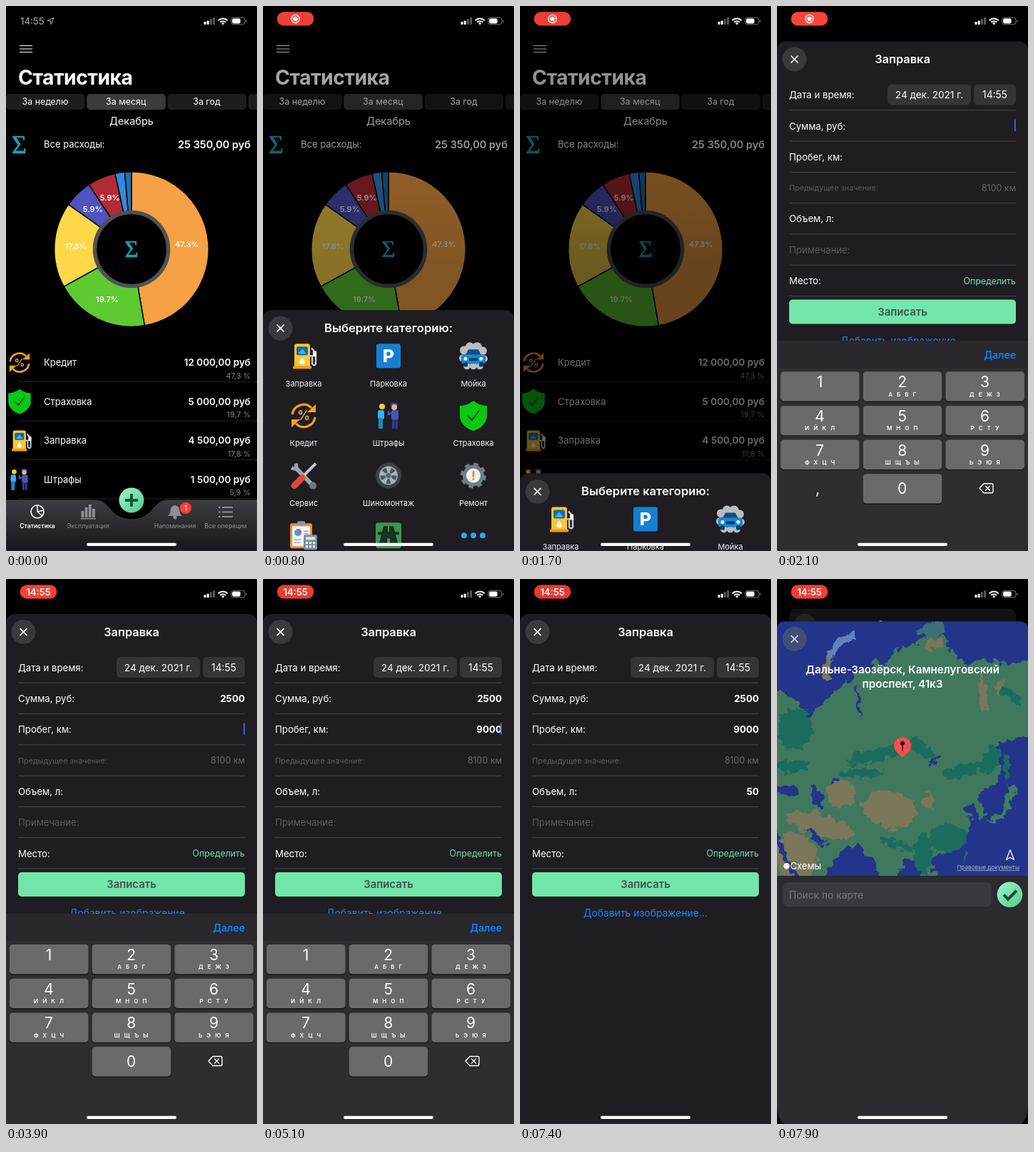
Write an HTML page that moves like this. It is 352 px wide and 762 px high and loops after 8000 ms.

```html
<!DOCTYPE html>
<html lang="ru">
<head>
<meta charset="utf-8">
<title>Расходы</title>
<style>
html, body { margin: 0; width: 100%; height: 100%; overflow: hidden; background: #000; }
svg { display: block; width: 100%; height: 100%; font-family: Inter, Roboto, sans-serif; }
</style>
</head>
<body>
<svg id="stage" viewBox="0 0 352 762"></svg>
<script>
const T = (x, y, size, str, fill = '#fff', anchor = 'start', weight = 400, extra = '') =>
  `<text x="${x}" y="${y + size * .36}" font-size="${size}" fill="${fill}" text-anchor="${anchor}" font-weight="${weight}" ${extra}>${str}</text>`;
const R = (x, y, w, h, fill, r = 0, extra = '') =>
  `<rect x="${x}" y="${y}" width="${w}" height="${h}" rx="${r}" fill="${fill}" ${extra}/>`;
const C = (x, y, r, fill, extra = '') => `<circle cx="${x}" cy="${y}" r="${r}" fill="${fill}" ${extra}/>`;
const F = (d, fill, extra = '') => `<path d="${d}" fill="${fill}" ${extra}/>`;
const L = (d, stroke, w = 1, extra = '') =>
  `<path d="${d}" fill="none" stroke="${stroke}" stroke-width="${w}" ${extra}/>`;
const G = (id, body, extra = '') => `<g id="${id}" ${extra}>${body}</g>`;
const at = (x, y, s, body) => `<g transform="translate(${x} ${y}) scale(${s})">${body}</g>`;
const round = 'stroke-linecap="round" stroke-linejoin="round"';
const SHEET = '#1f1d22', GRAY = '#8e8e93';

const icons = {
  fuel: R(-13, -17, 22, 34, '#ffc72c', 3) + R(-10, -13, 16, 12, '#1768b0', 2) + F('M-8 -3L-2 -10 4 -3Z', '#37b6f2') +
    R(-15, 14, 26, 4, '#e8a020', 1) + F('M-2 2C4 9 2 12 -2 12S-8 9 -2 2Z', '#f4f4f4') +
    L('M9 0H12V11Q15 15 17 11V-4L11 -11', '#c9ced3', 2.4) + R(13, -7, 5, 8, '#f2f2f2', 1),
  parking: R(-17, -17, 34, 34, '#1580d2', 3) + T(0, 0, 25, 'P', '#fff', 'middle', 800),
  wash: [[-13, -8, 6], [-5, -13, 6], [5, -12, 7], [13, -7, 6], [-15, 3, 5], [15, 4, 5], [-9, 14, 5], [9, 14, 5], [0, 14, 5], [0, -7, 7]]
    .map(c => C(...c, '#b9bcc0')).join('') + F('M-11 -1L-7 -9H7L11 -1Z', '#114f80') +
    R(-17, -2, 34, 13, '#1688d4', 4) + R(-14, 9, 6, 6, '#0d3c60', 1) + R(8, 9, 6, 6, '#0d3c60', 1) +
    C(-11, 4, 2.5, '#fff') + C(11, 4, 2.5, '#fff') + R(-6, 3, 12, 4, '#0d3c60', 1),
  credit: L('M-16 -2A16 16 0 0 1 11 -11M16 2A16 16 0 0 1 -11 11', '#ffa01c', 3.2) +
    F('M17 -16V-5H5ZM-17 16V5H-5Z', '#ffa01c') + T(0, 0, 18, '%', '#ffa01c', 'middle', 600),
  fines: C(-9, -13, 4, '#ffca3a') + R(-15, -8, 9, 13, '#35b2ee', 3) + R(-14, 3, 6, 15, '#1f86c8', 1) +
    R(3, -18, 10, 4, '#3646a8', 2) + C(8, -12, 4, '#e3b088') + R(4, -8, 10, 14, '#4656bb', 3) +
    L('M5 -4L0 -2V-7', '#4656bb', 2.5) + R(5, 5, 3.5, 13, '#2f3c92') + R(9.5, 5, 3.5, 13, '#2f3c92'),
  shield: F('M0 -21Q9 -14 19 -14V0C19 11 9 18 0 21C-9 18 -19 11 -19 0V-14Q-9 -14 0 -21Z', '#08c912') +
    L('M-8 0L-2 6 8 -7', '#0a4a12', 2),
  tools: L('M-11 -11L12 13', '#9aa4ad', 6, round) + L('M-17 -11Q-8 -6 -11 -17', '#9aa4ad', 5) +
    L('M17 -17L0 0', '#c3c9ce', 4) + L('M-2 3L-13 14', '#e0483f', 9, round) + C(13, 14, 5, '#6d767e'),
  tire: C(0, 0, 18, '#3d4248') + C(0, 0, 13, '#a8b2ba') + C(0, 0, 8, 'none', 'stroke="#4d555d" stroke-width="7" stroke-dasharray="5 5.05"') +
    C(0, 0, 3.5, '#5b646c'),
  repair: C(0, 0, 15, '#727c87', 'stroke="#727c87" stroke-width="6" stroke-dasharray="6 5.78"') + C(0, 0, 10, '#f3f3f3') +
    T(0, 0, 17, '!', '#ff8a10', 'middle', 800),
  tax: R(-19, -17, 31, 35, '#ef8f33', 3) + R(-16, -13, 25, 28, '#f5f5f5') + R(-9, -20, 11, 6, '#8d9aa5', 2) +
    C(-8, -4, 5, '#3aa5e8') + F('M-8 -4V-9A5 5 0 0 1 -3 -4Z', '#e8503f') + L('M0 -6H7M0 -2H7M-14 6H-4M-14 10H-4', '#9fb2bf', 1.4) +
    R(0, -1, 19, 21, '#78919f', 2) + R(3, 2, 13, 4, '#d8f0e0') +
    [0, 1, 2, 3, 4, 5].map(i => R(3 + i % 3 * 5, 9 + (i > 2) * 5, 3, 3, '#fff')).join(''),
  road: R(-18, -18, 36, 36, '#419351', 4) + F('M-7 -13H-1V-5H1V-13H7L9 -5H15V-1H10L14 14H2V4H-2V14H-14L-10 -1H-15V-5H-9Z', '#16331d'),
  more: [-13, 0, 13].map(x => C(x, 0, 4, '#27a9ee')).join('')
};
const sigma = (x, base, size) =>
  `<text x="${x}" y="${base}" font-size="${size}" text-anchor="middle" fill="#17a3bd" stroke="#17a3bd" stroke-width=".7" font-family="Liberation Serif, serif">Σ</text>`;
const closeBtn = (y, fill) => C(24.5, y, 17, fill) + L(`M20 ${y - 4.5}l9 9m0 -9l-9 9`, '#fff', 1.7, round);

function donut() {
  const slices = [[47.3, '#f6a144'], [19.7, '#5eca32'], [17.8, '#fed849'], [5.9, '#4f52bf'], [5.9, '#b32b35'], [2, '#2e8cdc'], [1.4, '#2470b8']];
  const pt = (v, r) => [176 + r * Math.sin(v * Math.PI / 50), 340 - r * Math.cos(v * Math.PI / 50)];
  let sum = 0, body = '', labels = '';
  for (const [v, color] of slices) {
    body += F(`M176 340L${pt(sum, 108.3)}A108.3 108.3 0 0 1 ${pt(sum + v, 108.3)}Z`, color, 'stroke="#000" stroke-width="1.5"');
    if (v > 5) labels += T(...pt(sum + v / 2, 78), 11, v + '%', '#fff', 'middle', 600);
    sum += v;
  }
  return body + labels + C(176, 340, 51.5, '#000', 'stroke="#505157" stroke-width="5.5"') + sigma(176, 351, 33);
}

function page() {
  const rows = [['credit', 'Кредит', '12 000,00', '47,3'], ['shield', 'Страховка', '5 000,00', '19,7'],
    ['fuel', 'Заправка', '4 500,00', '17,8'], ['fines', 'Штрафы', '1 500,00', '5,9']];
  const list = rows.map(([icon, name, sum, part], i) => {
    const y = 498.5 + i * 54.5;
    return at(icon == 'fuel' ? 20.5 : 19, y, .83, icons[icon]) + T(53, y, 13, name) + T(343, y, 13.5, sum + ' руб', '#fff', 'end', 600) +
      T(343, y + 18.5, 10.7, part + ' %', '#85858a', 'end') + R(18, y + 26.5, 334, 1, '#232326');
  }).join('');
  const tabs = ['За неделю', 'За месяц', 'За год', ''].map((s, i) =>
    R(i * 113.3, 123, 110.5, 22, i == 1 ? '#3b3b3e' : '#1d1d20', 5) + T(55 + i * 113.2, 134, 12.4, s, '#fff', 'middle')).join('');
  const nav = F('M0 691H126C146 691 145 718 176 718S206 691 226 691H352V762H0Z', 'url(#bar)', 'stroke="#48474c" stroke-width=".8"') +
    C(176, 691, 17.5, 'url(#mint)') + L('M176 682V700M167 691H185', '#0b5a3b', 4) +
    C(44, 707, 9, 'none', 'stroke="#fff" stroke-width="1.6"') + L('M44 698V707L51 713M44 707L53 705', '#fff', 1.5) +
    [9, 14, 18, 12].map((h, i) => R(105.5 + i * 5.2, 715 - h, 3.8, h, GRAY)).join('') + R(105, 716, 21, 1.5, GRAY) +
    F('M227 713C231 709 230 707 231 703Q232 699 237 698Q242 699 243 703C244 707 243 709 247 713Z', GRAY) + C(237, 715, 2.5, GRAY) +
    C(252, 702, 8, '#fc4038') + T(252, 702, 10, '1', '#fff', 'middle') +
    [701, 707.5, 714].map(y => R(298, y - 1, 2.5, 2, GRAY) + R(303, y - 1, 15, 2, GRAY)).join('') +
    T(44, 727, 8.6, 'Статистика', '#fff', 'middle', 600) + T(115, 727, 8.7, 'Эксплуатация', GRAY, 'middle') +
    T(237, 727, 8.7, 'Напоминания', GRAY, 'middle') + T(308, 727, 8.7, 'Все операции', GRAY, 'middle');
  return R(0, 0, 352, 762, '#000') + L('M19 55.5H37M19 60H37M19 64.5H37', '#fff', 1.2) +
    T(17, 99.5, 28.3, 'Статистика', '#fff', 'start', 700, 'letter-spacing="-.5"') + tabs + T(176, 161, 14.5, 'Декабрь', '#fff', 'middle') +
    sigma(18.5, 206, 36) + T(53, 193.5, 13, 'Все расходы:') + T(343, 193.5, 14.5, '25 350,00 руб', '#fff', 'end', 600) +
    donut() + list + nav;
}

function picker() {
  const names = ['Заправка', 'Парковка', 'Мойка', 'Кредит', 'Штрафы', 'Страховка', 'Сервис', 'Шиномонтаж', 'Ремонт', 'Налоги', 'Проезд', 'Прочее'];
  const order = ['fuel', 'parking', 'wash', 'credit', 'fines', 'shield', 'tools', 'tire', 'repair', 'tax', 'road', 'more'];
  return R(0, 350, 352, 430, SHEET, 12) + closeBtn(375.5, '#3b393e') + T(176, 375, 16.6, 'Выберите категорию:', '#fff', 'middle', 600) +
    names.map((s, i) => {
      const x = 57 + i % 3 * 119, y = 414 + (i / 3 | 0) * 83.7;
      return at(x, y, 1, icons[order[i]]) + T(x, y + 38.5, 11, s, '#f2f2f2', 'middle');
    }).join('');
}

const fieldY = [167, 210, 297];
function form() {
  const dim = '#5b5a5f';
  const rows = ['Дата и время:', 'Сумма, руб:', 'Пробег, км:', 'Предыдущее значение:', 'Объем, л:', 'Примечание:', 'Место:'];
  return R(0, 49, 352, 740, SHEET, 12) + closeBtn(74, '#3b393e') + T(176, 74, 16.4, 'Заправка', '#fff', 'middle', 600) +
    rows.map((s, i) => T(17, 124 + i * 43.3, i == 3 ? 10.8 : 13.2, s, i == 3 || i == 5 ? dim : '#fff') +
      R(17, 144.7 + i * 43.3, 318, 1, '#47464a')).join('') +
    R(155, 109, 117, 29, '#353439', 6) + T(213.5, 124, 13.6, '24 дек. 2021 г.', '#fff', 'middle') +
    R(276, 109, 59, 29, '#353439', 6) + T(305.5, 124, 13.8, '14:55', '#fff', 'middle') +
    T(335, 254, 12.4, '8100 км', '#68676c', 'end') + T(335, 384, 12.4, 'Определить', '#6fe4a8', 'end') +
    fieldY.map((y, i) => T(335, y, 13.4, '', '#fff', 'end', 700, `id="val${i}"`)).join('') +
    R(333, 0, 1.8, 17, '#4963e6', 1, 'id="caret"') +
    R(17, 410, 318, 34, '#72e6ab', 5) + T(176, 427, 14.9, 'Записать', '#46504b', 'middle', 600) +
    T(176, 467, 13.9, 'Добавить изображение...', '#1a84fb', 'middle');
}

function keyboard() {
  const letters = ['', 'АБВГ', 'ДЕЖЗ', 'ИЙКЛ', 'МНОП', 'РСТУ', 'ФХЦЧ', 'ШЩЪЫ', 'ЬЭЮЯ'];
  const key = (n, col, row, sub) => {
    const x = 5 + col * 115.7, y = 511 + row * 47.7;
    return R(x, y + 1, 110.5, 41.7, '#161618', 4.5) + R(x, y, 110.5, 41.3, '#6a696c', 4.5, `id="key${n}"`) +
      T(x + 55, y + (n ? 14.5 : 20.5), 21, n, '#fff', 'middle') +
      (sub ? T(x + 56, y + 31.5, 8, [...sub].join(' '), '#fff', 'middle', 600, 'letter-spacing="2"') : '');
  };
  return R(0, 468, 352, 300, '#2e2d30') + R(0, 468, 352, 38, '#29282c') + T(335, 487.5, 14, 'Далее', '#0f80ff', 'end', 600) +
    letters.map((s, i) => key(i + 1, i % 3, i / 3 | 0, s)).join('') + key(0, 1, 3) +
    T(57, 674, 21, ',', '#fff', 'middle', 400, 'id="comma"') +
    L('M284 674L290 667.5H301Q303 667.5 303 669.5V678.5Q303 680.5 301 680.5H290ZM292.5 671l6 6m0 -6l-6 6', '#fff', 1.4, round);
}

function mapSheet() {
  const teal = '#1c6c5e', tan = '#7b775b', sea = '#22358b';
  const E = (x, y, rx, ry, fill, turn = 0) => `<ellipse rx="${rx}" ry="${ry}" fill="${fill}" transform="translate(${x} ${y}) rotate(${turn})"/>`;
  const land = 'M-15 152L12 160 30 174 45 190 60 178 78 160 98 148 112 128 128 130 140 112 150 125 165 102 182 96 205 84 235 78 240 98 255 112 268 122 285 112 315 120 365 112V222L335 224 308 232 298 246 316 262 308 285 288 298 284 306 292 332 284 334 274 312 262 318 274 334 266 356 252 376 230 386 214 392 218 404 228 430H205L196 392 182 392 162 430H150L134 392 118 376 100 372 88 384 60 430H-15Z';
  const blobs = E(25, 210, 24, 30, teal, 10) + E(20, 262, 24, 9, teal) + E(135, 248, 40, 9, teal, -12) + E(120, 272, 32, 6, teal) +
    E(205, 240, 24, 9, teal, 40) + E(262, 268, 30, 9, teal, -20) + E(300, 255, 12, 22, teal, 20) + E(240, 362, 26, 20, teal) +
    E(205, 385, 12, 28, teal) + E(168, 372, 26, 5, teal, 15) + E(330, 165, 18, 7, teal, 40) +
    E(90, 302, 20, 18, tan) + E(158, 322, 38, 27, tan, 10) + E(60, 345, 48, 16, tan, 15) + E(25, 388, 30, 34, tan, -25) +
    E(213, 310, 8, 12, tan) + E(288, 160, 5, 26, tan, -8) + E(312, 150, 4, 12, tan, 20) + E(220, 92, 15, 6, tan, -20);
  const water = E(14, 297, 19, 7, sea, 10) + E(56, 305, 7, 19, sea, -20) + E(82, 283, 5, 5, sea) + E(48, 186, 5, 10, sea, 30) +
    L('M212 264L229 247', sea, 4) + L('M44 350L68 374', sea, 7) + L('M-6 350L26 420', sea, 8) + L('M112 150L118 190', sea, 4);
  const isles = L('M70 141Q66 118 77 104', '#7b775b', 8) + L('M73 112Q80 92 108 79', '#6580c0', 9) +
    F('M198 78L206 62 230 60 236 74 216 84Z', '#426f75') + F('M318 246L326 252 324 284 318 276Z', teal) +
    F('M326 288L340 296 330 304 328 324 308 340 296 342 312 328 320 308Z', '#437c60') + F('M262 378L268 384 262 398Z', teal);
  return F('M0 72Q0 60 12 60H340Q352 60 352 72V738Q352 768 322 768H30Q0 768 0 738Z', '#2c2a2f') +
    `<g clip-path="url(#mapClip)">${R(0, 60, 352, 356, sea)}<g filter="url(#rough)">${F(land, '#40785e')}${blobs}${water}${isles}</g></g>` +
    C(24.5, 84.5, 17, '#435473', 'opacity=".9"') + L('M20 80l9 9m0 -9l-9 9', '#c9d2dc', 1.7, round) +
    T(176, 127.5, 15.2, 'Дальне-Заозёрск, Камнелуговский', '#fff', 'middle', 600) + T(176, 147.5, 15.2, 'проспект, 41к3', '#fff', 'middle', 600) +
    F('M176 250L168 243A12 12 0 1 1 184 243Z', '#ff4b50') + C(176, 230.5, 3, '#111') + L('M176 232V241', '#111', 1.6) +
    C(13.5, 402, 4.3, '#fff') + T(18.5, 402.5, 13, 'Схемы') +
    T(340, 404, 8.2, 'Правовые документы', '#a9b9c9', 'end', 400, 'text-decoration="underline"') +
    L('M327 379.5L332.5 393.5 327 390 321.5 393.5Z', '#fff', 1.3, round) +
    R(8, 425, 293, 34, '#3b393f', 7) + T(17, 442.3, 13.8, 'Поиск по карте', '#77767b') +
    C(326.5, 442, 17.8, 'url(#mint)') + L('M318 442L324 448.5 336 436.5', '#0c5238', 4);
}

function status() {
  return G('clock', T(20, 21, 13, '14:55', '#fff', 'start', 500) + L('M58 20.5L67 16.5 63 25.5 62.5 21Z', '#fff', 1.1, 'stroke-linejoin="round"')) +
    G('pill', R(19.7, 8.2, 51.6, 19.4, '#ff453a', 9.7, 'id="pillBg"') +
      G('rec', C(45.5, 18, 5.6, 'none', 'stroke="#fff" stroke-width="1.4"') + C(45.5, 18, 3.2, '#fff')) +
      T(45.5, 18, 13, '14:55', '#fff', 'middle', 600, 'id="recTime"')) +
    [4, 5.5, 8, 10].map((h, i) => R(277.5 + i * 4.2, 26 - h, 3, h, i < 2 ? '#fff' : '#5a5a5c', .8)).join('') +
    L('M297.7 20.2A9.2 9.2 0 0 1 310.7 20.2M300.3 22.8A5.5 5.5 0 0 1 308.1 22.8', '#fff', 2.1) + F('M304.2 26.5L302 24.3A3.2 3.2 0 0 1 306.4 24.3Z', '#fff') +
    R(315.8, 16.2, 19, 9.6, 'none', 3, 'stroke="#777" stroke-width="1"') + R(317.2, 17.6, 11.5, 6.8, '#fff', 1.8) + R(336, 19.4, 1.4, 3.4, '#777', .7) +
    R(113, 750.8, 126, 4.2, '#fff', 2.1);
}

const stage = document.getElementById('stage');
stage.innerHTML = `<defs>
<linearGradient id="bar" x2="0" y2="1"><stop stop-color="#3d3c42"/><stop offset="1" stop-color="#161519"/></linearGradient>
<linearGradient id="mint" x2="1" y2="1"><stop stop-color="#a0f5cc"/><stop offset="1" stop-color="#4ecb8b"/></linearGradient>
<linearGradient id="shade" x2="0" y2="1"><stop offset=".1" stop-opacity=".42"/><stop offset=".48" stop-opacity=".58"/></linearGradient>
<clipPath id="mapClip"><path d="M0 416V72Q0 60 12 60H340Q352 60 352 72V416Z"/></clipPath>
<filter id="rough" filterUnits="userSpaceOnUse" x="-20" y="40" width="392" height="400" color-interpolation-filters="sRGB">
<feTurbulence type="fractalNoise" baseFrequency=".1" numOctaves="3" seed="4"/>
<feDisplacementMap in="SourceGraphic" scale="17" xChannelSelector="R" yChannelSelector="G"/></filter>
</defs>` + G('page', page()) + R(0, 0, 352, 762, 'url(#shade)', 0, 'id="dim"') + G('picker', picker()) +
  G('form', form()) + G('keyboard', keyboard()) + R(0, 0, 352, 762, '#000', 0, 'id="dim2"') + G('map', mapSheet()) + status();

const el = {};
stage.querySelectorAll('[id]').forEach(e => el[e.id] = e);
const set = (id, name, v) => el[id].setAttribute(name, v);
const show = (id, v) => set(id, 'opacity', +v);
const move = (id, y) => set(id, 'transform', `translate(0 ${y})`);
const ramp = (t, a, b) => Math.min(1, Math.max(0, (t - a) / (b - a)));
const spring = (t, start, w) => {
  const x = Math.max(0, t - start) * w;
  return 1 - (1 + x) * Math.exp(-x);
};

// [time, digit] taps for each field, and when each field takes the focus
const taps = [[[2500, 2], [2700, 5], [3000, 0], [3200, 0]], [[4100, 9], [4400, 0], [4600, 0], [4800, 0]], [[6000, 5], [6350, 0]]];
const focus = [1900, 3500, 5350, 6950];

function draw(now) {
  const t = now % 8000;
  show('clock', .62 * (1 - ramp(t, 50, 250)));
  show('pill', ramp(t, 90, 450));
  show('rec', 1 - ramp(t, 2550, 2800));
  show('recTime', ramp(t, 2550, 2800));
  const glow = .5 - .5 * Math.cos((t - 1300) / 2033 * 2 * Math.PI);
  set('pillBg', 'fill', `rgb(${228 + 27 * glow},${58 + 11 * glow},${50 + 8 * glow})`);

  const rise = spring(t, 600, .0155), drop = spring(t, 1570, .02);
  const up = spring(t, 1700, .024), kbDown = spring(t, 6950, .02), mapUp = spring(t, 7500, .0155);
  show('dim', rise);
  move('picker', 412 * (1 - rise + drop));
  set('form', 'transform', `translate(${17 * mapUp} ${713 * (1 - up) - 3.2 * mapUp}) scale(${1 - .097 * mapUp})`);
  move('keyboard', 294 * (1 - up + kbDown));
  show('dim2', .42 * mapUp);
  move('map', 702 - 713 * mapUp);

  const pressed = new Set();
  taps.forEach((list, i) => {
    el['val' + i].textContent = list.filter(k => t >= k[0] + 100).map(k => k[1]).join('');
    list.forEach(([at, n]) => t >= at && t < at + 130 && pressed.add(n));
  });
  for (let n = 0; n < 10; n++) set('key' + n, 'fill', pressed.has(n) ? '#454447' : '#6a696c');

  const field = focus.filter(f => t >= f).length - 1;
  const active = field >= 0 && field < 3;
  const last = active ? Math.max(focus[field], ...taps[field].map(k => k[0] + 100).filter(k => k <= t)) : 0;
  show('caret', active && (t - last) % 1000 < 600);
  if (active) set('caret', 'y', fieldY[field] - 9);
  show('comma', field != 1);
  requestAnimationFrame(draw);
}
requestAnimationFrame(draw);
</script>
</body>
</html>
```
